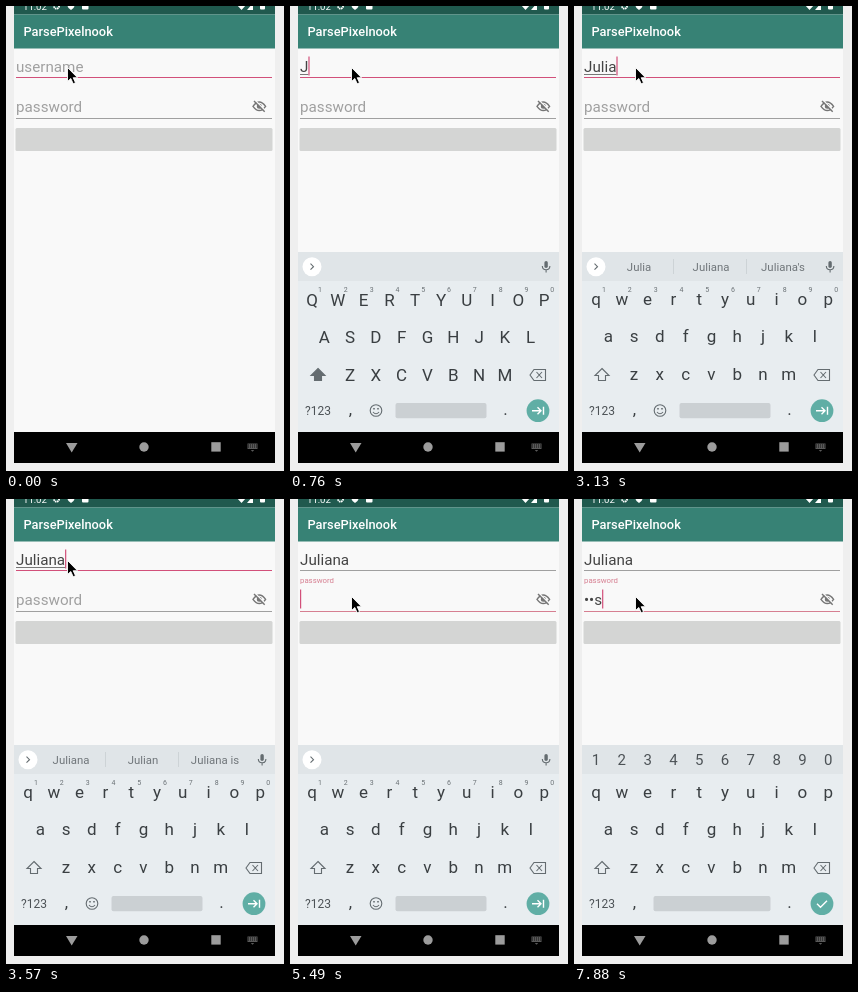
An HTML page for the animation above (8 s loop, 278 px wide and 465 px high).

```html
<!DOCTYPE html>
<html lang="en">
<head>
<meta charset="utf-8">
<title>Login typing</title>
<style>
  html, body { margin: 0; width: 100%; height: 100%; overflow: hidden; background: #efefef; }
  svg { display: block; width: 278px; height: 465px; font-family: Roboto, sans-serif; }
  .field { font-size: 15.2px; fill: #444; }
  .hint { fill: #a0a0a0; }
  .mid { text-anchor: middle; }
  .key { font-size: 17px; fill: #3a3f42; }
  .small { font-size: 12px; fill: #4c5256; }
  .digit { font-size: 15px; fill: #4c5256; }
  .sup { font-size: 7px; fill: #6b7276; }
  .sug { font-size: 11.4px; fill: #70767a; }
  .line { fill: none; stroke: #646c70; stroke-width: 1.1; }
  .white { fill: none; stroke: #fff; stroke-width: 1.4; }
  .grey { fill: #9c9c9c; }
</style>
</head>
<body>
<svg viewBox="0 0 278 465">
  <rect width="278" height="465" fill="#efefef"/>
  <rect x="8" width="261" height="457" fill="#f9f9f9"/>
  <rect x="8" width="261" height="8.5" fill="#20594e"/>
  <rect x="8" y="8.5" width="261" height="34" fill="#378275"/>

  <!-- status bar -->
  <g fill="#fff">
    <text x="17" y="3.5" font-size="9.6">11:02</text>
    <circle cx="50.5" cy="0" r="2.6" fill="none" stroke="#fff" stroke-width="1.8" stroke-dasharray="1.5 .5"/>
    <path d="M61.5 -4H68.5V0Q68 2.5 65 4Q62 2.5 61.5 0Z"/>
    <rect x="76" y="-4" width="6.5" height="7.5" rx="1"/>
    <path d="M231 -1H240L235.5 4ZM241 4L247 -3V4Z"/>
    <rect x="254" y="-4" width="5" height="7.5" rx="1"/>
  </g>
  <text x="17.5" y="30" font-size="12.8" font-weight="500" fill="#fff">ParsePixelnook</text>

  <!-- form -->
  <text id="user" class="field" x="10" y="66"/>
  <rect id="compose" x="10" y="68" height="1" fill="#777"/>
  <rect id="userLine" x="10" y="71" width="256" height="1"/>
  <text id="label" class="field" x="10">password</text>
  <text id="pass" class="field" x="10" y="106"/>
  <rect id="passLine" x="10" y="112" width="256" height="1"/>
  <rect id="caret" width="1.2" height="19"/>
  <g fill="none" stroke="#757575" stroke-width="1.4">
    <path d="M247 100.3Q253.3 91.8 259.6 100.3Q253.3 108.8 247 100.3Z"/>
    <circle cx="253.3" cy="100.3" r="1.8" fill="#757575"/>
    <path d="M249 94.3L260 105.3" stroke="#f9f9f9"/>
    <path d="M248 95L258.7 105.7"/>
  </g>
  <rect x="9.5" y="122" width="257" height="23" rx="1.5" fill="#d4d5d4"/>

  <!-- keyboard -->
  <g id="board">
    <rect x="8" y="246" width="261" height="180" fill="#e8edf0"/>
    <rect x="8" y="246" width="261" height="29" fill="#e0e5e8"/>
    <g id="strip">
      <circle cx="22" cy="260.7" r="9.5" fill="#fff"/>
      <path class="line" d="M20.5 257.7L23.5 260.7L20.5 263.7"/>
      <g id="sugs">
        <path d="M99.5 253V268M172.5 253V268" stroke="#cdd3d6"/>
      </g>
      <rect x="254.4" y="255" width="3.4" height="7" rx="1.7" fill="#646c70"/>
      <path class="line" d="M252.3 260Q252.5 263.8 256.1 263.8T259.9 260M256.1 263.8V266.5"/>
    </g>
    <g id="digits"></g>
    <g id="keys"></g>
    <path id="shift" class="line" d="M28 362.5L35 369.5H31.5V374.5H24.5V369.5H21Z"/>
    <path class="line" d="M240 369L244 363.5H255.5V374.5H244ZM246.5 366L252 372M252 366L246.5 372"/>
    <text class="small" x="15" y="409">?123</text>
    <text class="key mid" x="60.5" y="408.5">,</text>
    <text class="key mid" x="215.5" y="408.5">.</text>
    <g id="emoji">
      <circle class="line" cx="86" cy="404.5" r="5.8"/>
      <path class="line" d="M83 406Q86 409.5 89 406"/>
      <path d="M83.2 402.7h1.6M87.2 402.7h1.6" stroke="#646c70" stroke-width="1.6"/>
    </g>
    <rect id="space" y="397" height="15.3" rx="2" fill="#cbd0d3"/>
    <circle cx="248" cy="404.7" r="11.4" fill="#60aea5"/>
    <path id="next" class="white" d="M242 404.7H251M247.5 401.2L251 404.7L247.5 408.2M253.5 400.7V408.7"/>
    <path id="done" class="white" d="M243 404.7L246.5 408.2L253 401.7"/>
  </g>

  <!-- navigation bar -->
  <rect x="8" y="426" width="261" height="31" fill="#000"/>
  <path class="grey" d="M60 437H71.5L65.7 446.5Z"/>
  <circle class="grey" cx="138" cy="441" r="4.7"/>
  <rect class="grey" x="205.3" y="436.2" width="9.4" height="9.4"/>
  <rect x="241.5" y="437.5" width="10" height="5.5" fill="#5a5a5a"/>
  <path d="M242 439h9M242 441h9" stroke="#000" stroke-width=".8" stroke-dasharray="1 1"/>
  <path d="M244.8 444H248.2L246.5 445.8Z" fill="#5a5a5a"/>

  <path id="pointer" d="M0 0V14L3.3 11L5.7 16.3L8 15.2L5.7 10.2H10Z" fill="#000" stroke="#fff" stroke-width=".9"/>
</svg>
<script>
const LOOP = 8000;
const PINK = '#d2507a', ROSE = '#d67f91', GREY = '#a0a0a0';
const $ = id => document.getElementById(id);
const show = (id, on) => $(id).setAttribute('visibility', on ? 'inherit' : 'hidden');
const set = (id, attrs) => {
  for (const name in attrs) $(id).setAttribute(name, attrs[name]);
};

function addText(parent, x, y, cls, text = '') {
  const el = document.createElementNS('http://www.w3.org/2000/svg', 'text');
  el.setAttribute('x', x);
  el.setAttribute('y', y);
  el.setAttribute('class', cls + ' mid');
  el.textContent = text;
  parent.append(el);
  return el;
}

const STEP = 25.8;
const rows = [['qwertyuiop', 22, 298.7], ['asdfghjkl', 34.3, 335.7], ['zxcvbnm', 60, 373.5]];
const letters = rows.flatMap(([row, x, y]) =>
  [...row].map((c, i) => ({ c, y, el: addText($('keys'), x + i * STEP, y, 'key') })));
const numbers = [...'1234567890'];
const sups = numbers.map((c, i) => addText($('keys'), 30 + i * STEP, 286, 'sup', c));
numbers.forEach((c, i) => addText($('digits'), 22 + i * STEP, 266.3, 'digit', c));
const sugTexts = [65, 137, 209].map(x => addText($('sugs'), x, 265, 'sug'));

const start = {
  user: '', pass: '', focus: 'user', caret: false, compose: true,
  board: '', sugs: '', lift: 0, at: [61.5, 61.5]
};
// Each entry: time in ms, then what changes from there on
const steps = [
  [620, { board: 'upper' }],
  [760, { user: 'J', caret: true }],
  [1060, { board: 'lower' }],
  [1210, { caret: false }],
  [1500, { sugs: 'J,Just,I' }],
  [1800, { caret: true }],
  [2090, { user: 'Ju', sugs: 'Ju,J,Just' }],
  [2390, { user: 'Jul', sugs: 'Jul,July,Julia' }],
  [2680, { user: 'Juli', sugs: 'Juli,Julia,Julie' }],
  [3130, { user: 'Julia', sugs: "Julia,Juliana,Juliana's" }],
  [3270, { user: 'Julian', sugs: "Julian,Juliana,Julian's" }],
  [3570, { user: 'Juliana', sugs: 'Juliana,Julian,Juliana is' }],
  [4010, { caret: false }],
  [4160, { at: [62.5, 67] }],
  [4300, { at: [64, 77] }],
  [4450, { at: [64.5, 87], caret: true }],
  [4600, { at: [63, 95] }],
  [4750, { at: [61.5, 97.5] }],
  [5040, { caret: false }],
  [5190, { focus: 'pass', compose: false, lift: 0.5 }],
  [5340, { lift: 1, caret: true }],
  [5490, { sugs: '' }],
  [5790, { board: 'secret', caret: false }],
  [6390, { pass: 't', caret: true }],
  [6840, { caret: false }],
  [6990, { pass: '•e', caret: true }],
  [7590, { caret: false }],
  [7880, { pass: '••s', caret: true }]
];

function draw(s) {
  const upper = s.board === 'upper', secret = s.board === 'secret';
  const onUser = s.focus === 'user';

  $('user').textContent = s.user || 'username';
  $('user').classList.toggle('hint', !s.user);
  $('pass').textContent = s.pass;
  const width = id => s[id] ? $(id).getComputedTextLength() : 0;
  set('compose', { width: s.compose ? width('user') : 0 });
  set('userLine', { fill: onUser ? PINK : GREY });
  set('passLine', { fill: onUser ? GREY : ROSE });
  set('caret', { x: 10 + width(s.focus), y: onUser ? 50.5 : 90.5, fill: PINK });
  show('caret', s.caret);

  $('label').style.fontSize = 15.2 - 7.4 * s.lift + 'px';
  $('label').style.fill = s.lift ? ROSE : GREY;
  set('label', { y: 106 - 22 * s.lift });

  show('board', s.board);
  show('strip', !secret);
  show('digits', secret);
  show('emoji', !secret);
  show('next', !secret);
  show('done', secret);
  show('sugs', s.sugs);
  const words = s.sugs.split(',');
  sugTexts.forEach((el, i) => el.textContent = words[i] || '');
  letters.forEach(({ c, y, el }) => {
    el.textContent = upper ? c.toUpperCase() : c;
    el.setAttribute('y', upper ? y + 1 : y);
  });
  sups.forEach(el => el.setAttribute('visibility', secret ? 'hidden' : 'inherit'));
  $('shift').style.fill = upper ? '#646c70' : 'none';
  set('space', { x: secret ? 79.5 : 105.5, width: secret ? 117 : 91 });
  set('pointer', { transform: `translate(${s.at})` });
}

let shown = -1;
function tick(now) {
  const past = steps.filter(([time]) => time <= now % LOOP);
  if (past.length !== shown) {
    shown = past.length;
    draw(Object.assign({}, start, ...past.map(step => step[1])));
  }
  requestAnimationFrame(tick);
}
tick(0);
</script>
</body>
</html>
```
